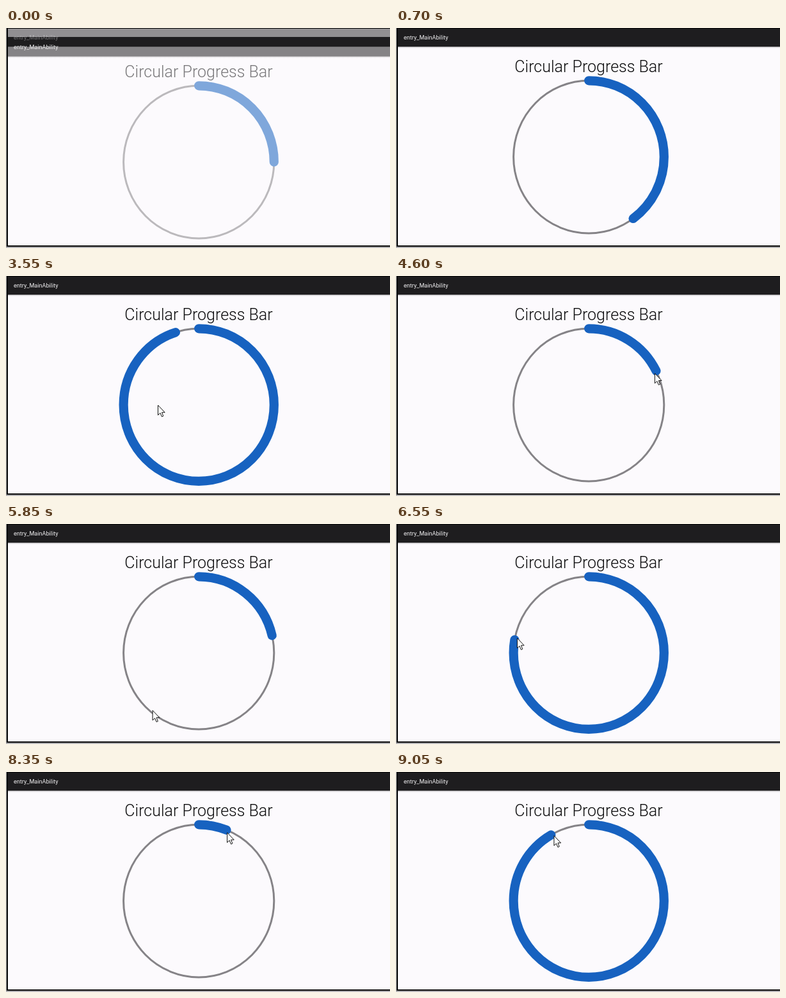
An HTML page for the animation above (9.1 s loop, 600 by 344 pixels).

```html
<!DOCTYPE html>
<html lang="en">
<head>
<meta charset="utf-8">
<title>Circular Progress Bar</title>
<style>
html, body { margin: 0; width: 100%; height: 100%; overflow: hidden; background: #fcfafd; }
svg { display: block; width: 600px; height: 344px; }
text { font-family: Roboto, Inter, sans-serif; }
.label { font-size: 9.1px; fill: #f0eff1; }
</style>
</head>
<body>
<svg viewBox="0 0 600 344">
  <defs>
    <linearGradient id="shade" x2="0" y2="1">
      <stop stop-color="#d0ced1"/>
      <stop offset="1" stop-color="#fcfafd"/>
    </linearGradient>
  </defs>
  <rect width="600" height="344" fill="#fcfafd"/>
  <g id="page">
    <text x="301" y="69" font-size="25" font-weight="300" text-anchor="middle" fill="#0b0b0c">Circular Progress Bar</text>
    <ellipse cx="301.2" cy="201.6" rx="117.6" ry="119.3" fill="none" stroke="#858387" stroke-width="3"/>
    <path id="bar" d="M301.2 82.3a117.6 119.3 0 0 1 0 238.6a117.6 119.3 0 0 1 0 -238.6" pathLength="100"
      fill="none" stroke="#1762c0" stroke-width="14.2" stroke-linecap="round"/>
  </g>
  <rect id="shadow" width="600" height="3" fill="url(#shade)"/>
  <rect id="low" y="29" width="600" fill="#858386"/>
  <rect width="600" height="29.3" fill="#1e1d1f"/>
  <rect id="high" width="600" fill="#918f92"/>
  <text id="ghost" class="label" x="12" y="18">entry_MainAbility</text>
  <text id="name" class="label" x="12" y="18">entry_MainAbility</text>
  <path d="M0 0H600V1H3V340H600V342.3H0Z" fill="#050505"/>
  <path d="M.5 0V343.5H600" fill="none" stroke="#a5a4a6"/>
  <path id="cursor" d="M0 0V15.5L3.5 12.2L6 18L8.3 17L6 11.3H10.7Z" fill="#fff" stroke="#111" stroke-linejoin="round"/>
</svg>
<script>
const LOOP = 9100, STEP = 50;
const ENTER = 2900, PRESS = 4250, GRAB = 5850;
const GRIP = 9, RELEASE = 21.3;

// Moves of the hand along the ring: start, end, change in percent
const moves = [
  [PRESS, 4750, RELEASE - GRIP], [4800, 5600, 39.2], [GRAB, 7300, 35.8],
  [7650, 8150, 11], [8150, 8750, -4], [8950, 9050, -11.6]
];

const $ = id => document.getElementById(id);
const set = (id, attrs) => {
  for (const k in attrs) $(id).setAttribute(k, attrs[k]);
};
const ramp = (t, a, b) => Math.min(1, Math.max(0, (t - a) / (b - a)));
const mix = (a, b, f) => a.map((v, i) => v + (b[i] - v) * f);

const hand = t => moves.reduce((sum, [a, b, d]) => sum + d * ramp(t, a, b), GRIP);

function onRing(percent) {
  const a = percent * Math.PI / 50;
  return [301.2 + 114 * Math.sin(a), 201.6 - 116 * Math.cos(a)];
}

function progress(t, fade) {
  if (t < PRESS) return Math.min(100, 26.5 + t / 51.8 - 1.5 * fade);
  if (t <= GRAB) return Math.min(RELEASE, hand(t));
  const p = hand(t);
  return p > 100 ? p - 100 : p;
}

function pointer(t) {
  if (t >= PRESS) return onRing(hand(t) + 0.4);
  const rest = [237.5, 202];
  return t < 3600
    ? mix([4, 245], rest, ramp(t, ENTER, 3500))
    : mix(rest, onRing(GRIP), ramp(t, 3600, PRESS));
}

function draw(t) {
  // The page slides up and fades in
  const fade = 1 - ramp(t, 0, 200);
  set('page', { transform: `translate(0 ${8 * fade})`, opacity: 1 - 0.46 * fade });
  set('low', { height: 15.5 * fade });
  set('high', { height: 14 * fade });
  set('shadow', { y: 29 + 15 * fade });
  set('ghost', { opacity: 0.4 * fade });
  set('name', { y: 18 + 15 * fade });

  set('bar', { 'stroke-dasharray': `${progress(t, fade)} 200` });
  set('cursor', {
    transform: `translate(${pointer(t)})`,
    visibility: t < ENTER ? 'hidden' : 'visible'
  });
}

const start = performance.now();
function tick() {
  const t = (performance.now() - start) % LOOP;
  draw(Math.floor(t / STEP) * STEP);
  requestAnimationFrame(tick);
}
tick();
</script>
</body>
</html>
```
